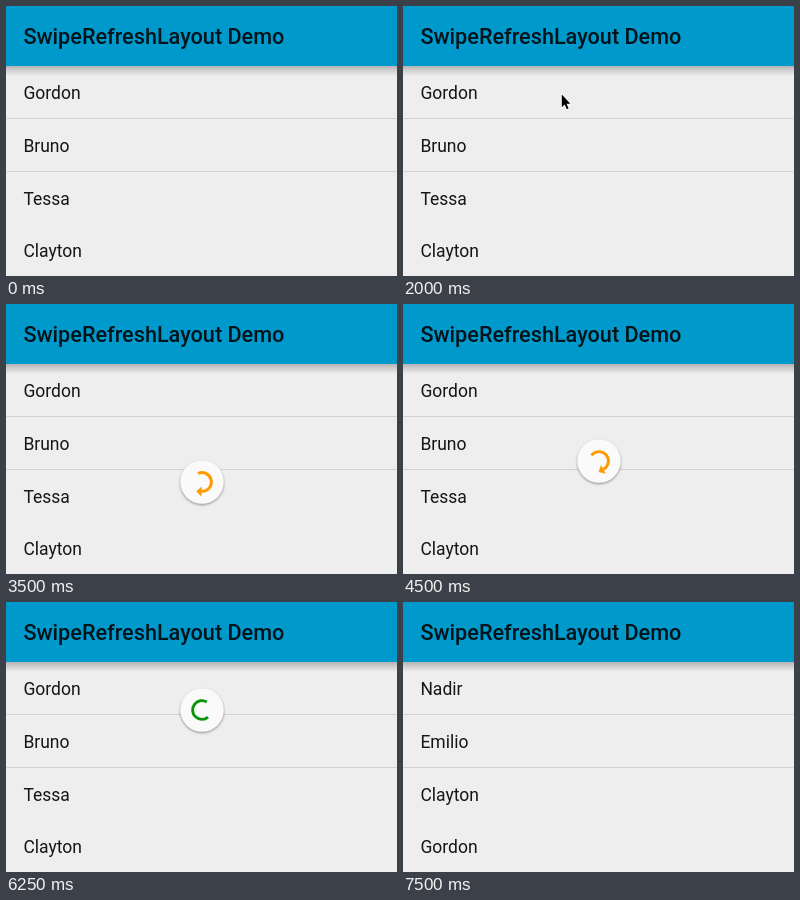
An HTML page that plays this animation: 391x270 px, repeating every 9.5 s.

```html
<!DOCTYPE html>
<html lang="en">
<head>
<meta charset="utf-8">
<title>SwipeRefreshLayout Demo</title>
<style>
  html, body { margin: 0; width: 100%; height: 100%; overflow: hidden; background: #eee; }
  svg { display: block; width: 391px; height: 270px; font-family: Roboto, sans-serif; }
  .title { font-size: 21.65px; font-weight: 500; fill: #02131a; }
  .row { font-size: 17.5px; fill: #161616; }
</style>
</head>
<body>
<svg viewBox="0 0 391 270">
  <defs>
    <linearGradient id="shade" x1="0" y1="0" x2="0" y2="1">
      <stop offset="0" stop-opacity=".25"/>
      <stop offset=".45" stop-opacity=".13"/>
      <stop offset="1" stop-opacity="0"/>
    </linearGradient>
    <filter id="soft" x="-30%" y="-30%" width="160%" height="160%">
      <feGaussianBlur stdDeviation="1.3"/>
    </filter>
  </defs>
  <rect width="391" height="270" fill="#eee"/>
  <path d="M0 112.5H391M0 165.5H391" stroke="#d3d3d3"/>
  <g id="rows"></g>
  <rect y="60" width="391" height="10" fill="url(#shade)"/>
  <rect width="391" height="60" fill="#09c"/>
  <text class="title" x="17.4" y="38">SwipeRefreshLayout Demo</text>
  <g id="badge">
    <circle cy="1.2" r="22" opacity=".34" filter="url(#soft)"/>
    <circle r="21.8" fill="#fafafa"/>
    <g id="ring">
      <path id="arc" fill="none" stroke-width="2.9"/>
      <path id="head" d="M-5 0H5L0 5.5Z"/>
    </g>
  </g>
  <path id="cursor" d="M.8 1.6V14.2L3.7 11.5L5.8 16.3L7.6 15.5L5.6 10.8H9.4Z"
        stroke="#fff" stroke-width="1.4" paint-order="stroke"/>
</svg>
<script>
const LOOP = 9500, STEP = 250;
const ORANGE = '#ff9900', GREEN = '#0a930a';
const SPIN_START = 4570, CYCLE = 1333, RADIUS = 9.4;
const BEFORE = ['Gordon', 'Bruno', 'Tessa', 'Clayton'];
const AFTER = ['Nadir', 'Emilio', 'Clayton', 'Gordon'];

// Pointer position for each step from 250 ms on
const POINTER = [
  [108, 40], [109, 60], [117, 82], [130, 77], [137, 68],
  [146, 77], [153, 83], [158, 87], [163, 104], [165, 127],
  [165, 160], [165, 190]
];

// Pulled badge: time, y, arc start, arc end, opacity, arrow
const PULL = [
  [3000, 89, -15, 155, .3, 0],
  [3250, 140, -100, 100, .6, 1],
  [3500, 178, -115, 92, 1, 1],
  [4000, 177, -118, 89, 1, 1],
  [4500, 157, -143, 62, 1, 1]
];

const $ = id => document.getElementById(id);
const show = (el, on) => { el.style.display = on ? '' : 'none'; };

const rows = BEFORE.map((_, i) => {
  const text = document.createElementNS('http://www.w3.org/2000/svg', 'text');
  text.setAttribute('class', 'row');
  text.setAttribute('x', 17.4);
  text.setAttribute('y', 93.2 + i * 52.7);
  return $('rows').appendChild(text);
});

function point(deg) {
  const a = deg * Math.PI / 180;
  return [RADIUS * Math.cos(a), RADIUS * Math.sin(a)].map(v => v.toFixed(2)).join(' ');
}

function drawBadge({ y, from, to, color, alpha = 1, arrow = 0, scale = 1 }) {
  $('badge').setAttribute('transform', `translate(196 ${y}) scale(${scale})`);
  $('ring').setAttribute('opacity', alpha);
  $('arc').setAttribute('stroke', color);
  $('arc').setAttribute('d',
    `M${point(from)}A${RADIUS} ${RADIUS} 0 ${to - from > 180 ? 1 : 0} 1 ${point(to)}`);
  $('head').setAttribute('fill', color);
  $('head').setAttribute('transform', `rotate(${to}) translate(${RADIUS} 0)`);
  show($('head'), arrow);
}

// Fast out, slow in
function ease(x) {
  const y = 1 - (1 - Math.min(1, Math.max(0, x))) ** 1.7;
  return y * y * (3 - 2 * y);
}

function spinner(t) {
  const turns = (t - SPIN_START) / CYCLE;
  const n = Math.floor(turns), p = turns - n;
  const base = 187 + 234 * turns + 288 * n;
  return {
    y: 108,
    from: base + 288 * ease(2 * p - 1),
    to: base + 288 * ease(2 * p) + 20,
    color: n ? GREEN : ORANGE,
    scale: t < 7250 ? 1 : .4
  };
}

function pulled(t) {
  const [, y, from, to, alpha, arrow] = PULL.filter(k => k[0] <= t).pop();
  return { y, from, to, alpha, arrow, color: ORANGE };
}

function render(time) {
  const t = Math.floor(time % LOOP / STEP) * STEP;
  const names = t < 7250 ? BEFORE : AFTER;
  rows.forEach((row, i) => { row.textContent = names[i]; });

  const tip = POINTER[t / STEP - 1];
  show($('cursor'), tip);
  if (tip) $('cursor').setAttribute('transform', `translate(${tip})`);

  const active = t >= PULL[0][0] && t < 7500;
  show($('badge'), active);
  if (active) drawBadge(t < 4750 ? pulled(t) : spinner(t));
}

const start = performance.now();
function tick() {
  render(performance.now() - start);
  requestAnimationFrame(tick);
}
tick();
</script>
</body>
</html>
```
